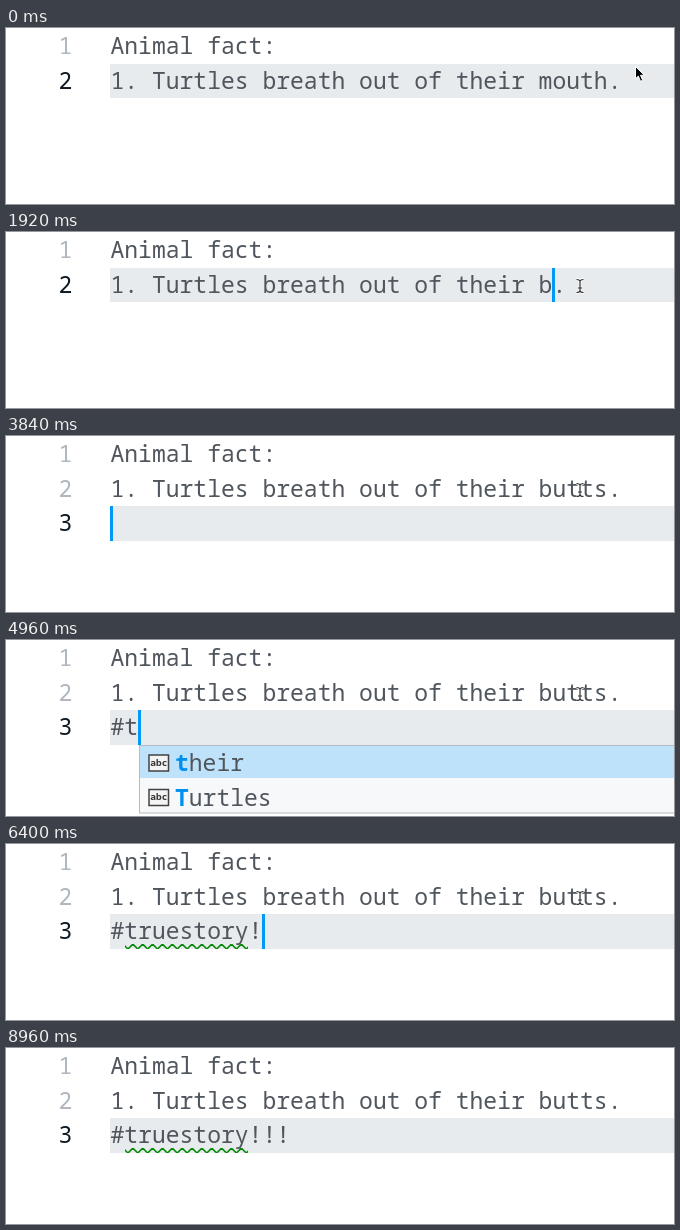
An HTML page for the animation above (9.12 s loop, 668 by 176 pixels).

```html
<!DOCTYPE html>
<html lang="en">
<head>
<meta charset="utf-8">
<title>Editor typing</title>
<style>
html, body { margin: 0; width: 100%; height: 100%; overflow: hidden; background: #fff; }
svg { display: block; width: 668px; height: 176px; }
text { font: 23.03px "Noto Sans Mono", monospace; fill: #50565d; white-space: pre; }
.num { fill: #b0b6bd; }
.num.on { fill: #0f1a24; }
.row { fill: #e7ebee; }
.sel { fill: #66cbff; }
.caret { fill: #0099f5; }
.wave { fill: none; stroke: #088a08; stroke-width: 1.6; }
.list { fill: #f6f8f9; stroke: #b4bac0; }
.pick { fill: #bfe2fb; }
.hit { fill: #0090f0; font-weight: 700; }
.icon { fill: #f4f4f4; stroke: #424242; stroke-width: 1.5; }
.abc { font-size: 9.5px; font-weight: 600; fill: #333; }
.halo { fill: none; stroke: #fff; stroke-width: 2.8; }
.beam { fill: none; stroke: #333; stroke-width: 1.2; }
.arrow { fill: #000; stroke: #fff; stroke-width: 1; }
</style>
</head>
<body>
<svg id="stage" viewBox="0 0 668 176"></svg>
<script>
const LOOP = 9120, LEFT = 104.5, CELL = 13.82;
const stage = document.getElementById('stage');
const fact = word => `1. Turtles breath out of their ${word}.`;
const tops = [1, 36, 70], bases = [26, 61, 95];

// Each entry changes part of the state; brackets in list items mark matched letters.
const script = [
  [0, { word: 'mouth', tag: '', row: 1, caret: -1, bar: true, sel: false, wave: false,
        list: [], arrow: true, mouse: [629.5, 38.5] }],
  [160, { mouse: [627, 37], arrow: false }],
  [320, { mouse: [604, 48] }],
  [480, { mouse: [576, 66] }],
  [640, { mouse: [566.5, 60], caret: 33 }],
  [800, { mouse: [566.5, 56.5], caret: 36, sel: true, bar: false }],
  [1120, { mouse: [567, 56] }],
  [1280, { mouse: [570.5, 55], caret: -1 }],
  [1440, { mouse: [574, 54] }],
  [1920, { word: 'b', caret: 32, sel: false, bar: true }],
  [2080, { word: 'bu', caret: 33 }],
  [2240, { word: 'but', caret: 34 }],
  [2400, { word: 'butt', caret: 35 }],
  [2560, { word: 'butts', caret: 36 }],
  [3040, { caret: -1 }],
  [3200, { caret: 37 }],
  [3680, { caret: -1 }],
  [3840, { row: 2, caret: 0 }],
  [4320, { caret: -1 }],
  [4640, { tag: '#', caret: 1 }],
  [4960, { tag: '#t', caret: 2, list: ['[t]heir', '[T]urtles'] }],
  [5120, { tag: '#tr', caret: 3, list: ['[T]u[r]tles', '[t]hei[r]'] }],
  [5280, { tag: '#true', caret: 5, list: ['[Tur]tl[e]s'] }],
  [5760, { tag: '#trues', caret: 6, list: ['[Tur]tl[es]'] }],
  [5920, { tag: '#truest', caret: 7, list: [] }],
  [6080, { tag: '#truesto', caret: 8 }],
  [6240, { tag: '#truestor', caret: 9 }],
  [6400, { tag: '#truestory!', caret: 11, wave: true }],
  [6720, { tag: '#truestory!!', caret: 12 }],
  [6880, { tag: '#truestory!!!', caret: 13 }],
  [7360, { caret: -1 }],
  [7840, { caret: 13, mouse: [575, 58] }],
  [8000, { mouse: [581, 84] }],
  [8160, { mouse: [588, 126] }],
  [8320, { mouse: [594, 167], caret: -1 }],
  [8480, { mouse: null }],
  [8800, { caret: 13 }],
  [8960, { caret: -1 }]
];

const rect = (cls, x, y, w, h, r = 0) =>
  `<rect class="${cls}" x="${x}" y="${y}" width="${w}" height="${h}" rx="${r}"/>`;
const text = (cls, x, y, s) => `<text class="${cls}" x="${x}" y="${y}">${s}</text>`;
const path = (cls, d) => `<path class="${cls}" d="${d}"/>`;
const colX = col => Math.floor(LEFT + col * CELL);

// Zigzag under the word, clipped to its width.
function wave() {
  const half = 4.93;
  let d = 'M-2 100.1';
  for (let i = 0; i < 28; i++) d += `l${half} ${i % 2 ? -4.9 : 4.9}`;
  return `<svg x="119" y="100" width="123" height="5" viewBox="0 100 123 5">${path('wave', d)}</svg>`;
}

function popup(items, x) {
  const step = 34.5;
  let out = rect('list', x + .5, 105.5, 700, items.length * step - 1.5);
  out += rect('pick', x + 1, 106, 700, 32);
  items.forEach((item, i) => {
    const y = i * step;
    const label = item.replace(/\[/g, '<tspan class="hit">').replace(/\]/g, '</tspan>');
    out += rect('icon', x + 10, 115 + y, 19.5, 16);
    out += text('abc', x + 11.3, 125.5 + y, 'abc');
    out += text('', x + 36, 131 + y, label);
  });
  return out;
}

function pointer([x, y], arrow) {
  const beam = 'M-3.5 -6.5Q0 -6.5 0 -4.5V4.5Q0 6.5 -3.5 6.5M3.5 -6.5Q0 -6.5 0 -4.5M0 4.5Q0 6.5 3.5 6.5M-2 2H2';
  const shape = arrow
    ? path('arrow', 'M0 0V12.2L2.8 9.6L5 14.8L7.2 13.8L5 8.8H8.8Z')
    : path('halo', beam) + path('beam', beam);
  return `<g transform="translate(${x} ${y})">${shape}</g>`;
}

function draw(s) {
  const tall = s.row === 2 ? 35 : 34;
  let out = '';
  if (s.bar) out += rect('row', 104, tops[s.row], 564, tall);
  if (s.sel) out += rect('sel', 533, 36, 69, 34, 4);
  ['Animal fact:', fact(s.word), s.tag].slice(0, s.row + 1).forEach((line, i) => {
    out += text(i === s.row ? 'num on' : 'num', 52.5, bases[i], i + 1);
    out += text('', LEFT, bases[i], line);
  });
  if (s.wave) out += wave();
  if (s.caret >= 0) out += rect('caret', colX(s.caret), tops[s.row], 3, tall);
  if (s.list.length) out += popup(s.list, colX(s.caret) + 1);
  if (s.mouse) out += pointer(s.mouse, s.arrow);
  stage.innerHTML = out;
}

let shown = -1;
function tick() {
  const t = performance.now() % LOOP;
  const past = script.filter(([at]) => at <= t);
  if (past.length !== shown) {
    shown = past.length;
    draw(Object.assign({}, ...past.map(([, change]) => change)));
  }
  requestAnimationFrame(tick);
}
tick();
</script>
</body>
</html>
```
